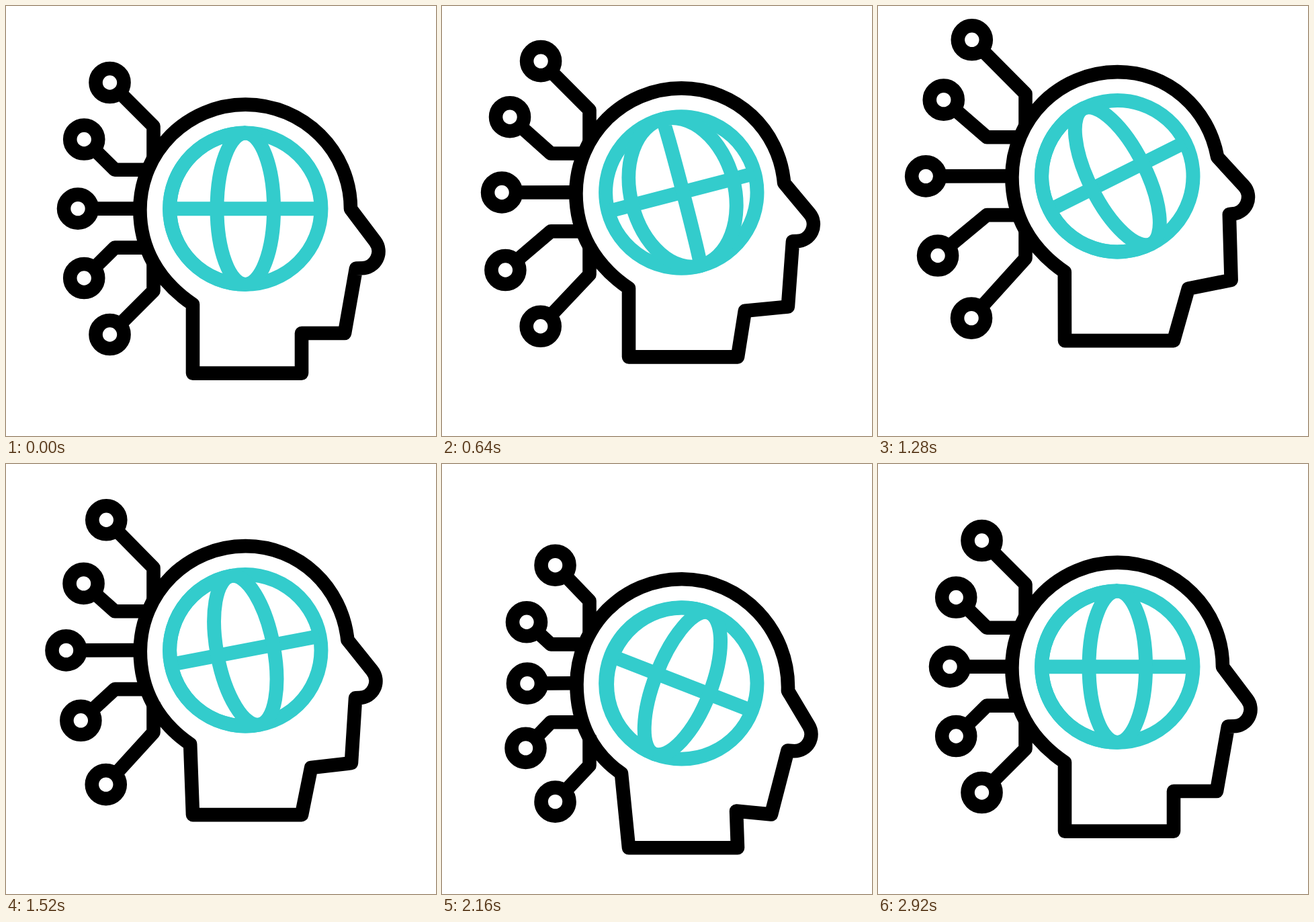
These frames come from a looping animation (640x640 px, 3 s). An HTML page:

```html
<!DOCTYPE html>
<html lang="en">
<head>
<meta charset="utf-8">
<title>Global mind</title>
<style>
  html, body { margin: 0; width: 100%; height: 100%; overflow: hidden; background: #fff; }
  svg { display: block; width: 100vw; height: 100vh; }
</style>
</head>
<body>
<svg viewBox="0 0 640 640" fill="none" stroke="#000" stroke-width="20.6" stroke-linejoin="round">
  <g id="body">
    <g id="links"></g>
    <path id="head"/>
    <g id="globe" stroke="#33cccc" stroke-width="20.9">
      <circle r="112.7"/>
      <path d="M-112 0H112"/>
      <path id="meridians"/>
    </g>
  </g>
</svg>
<script>
const LOOP = 3000, STEP = 40;
const $ = id => document.getElementById(id);
const body = $('body'), head = $('head'), globe = $('globe'), meridians = $('meridians');

const ease = u => {
  u = Math.min(1, Math.max(0, u));
  return u < 0.5 ? 4 * u ** 3 : 1 - 4 * (1 - u) ** 3;
};

// Progress of the three moves: rest to raised, raised to lowered, lowered to rest.
const moves = (t, lead1 = 0, lead2 = 0) => [
  ease((t + lead1 - 165) / 960),
  ease((t + lead2 - 1125) / 900),
  ease((t - 1980) / 900)
];

const mix = ([a, b, c], [p, q, r]) => a + (b - a) * p + (c - b) * q + (a - c) * r;

// Each point: [x at rest, raised, lowered], [y at rest, raised, lowered]
const shape = {
  chin: [[440, 462.4, 438], [487, 468.5, 492]],
  jaw: [[504, 526.4, 489.5], [487, 455.5, 497.2]],
  lip: [[521, 523, 514.3], [390.5, 357.7, 402.3]],
  nose: [[529.5, 526, 524.3], [365.3, 332, 378]],
  brow: [[513, 505, 515], [302, 272.5, 313.3]],
  browGrip: [[513, 491, 518], [216, 200, 223]],
  topGrip: [[443, 432, 446], [146.6, 146.6, 146.2]],
  left: [[199.4, 199.4, 200.5], [303.2, 303.2, 303.2]],
  leftGrip: [[199.4, 199.4, 200.5], [360, 360, 360]],
  napeGrip: [[226, 226, 224], [409, 409, 406]],
  nape: [[278, 278, 266.6], [444, 444.5, 435.6]]
};
const NOSE_R = 25;

const nodes = [
  { at: [[154.5, 139.2, 169], [114, 98.2, 126.4]], wire: 'L219.5 179V226' },
  { at: [[116.2, 94.5, 126.3], [198.5, 185.5, 211]], wire: 'L162 243.7H205', early: true },
  { at: [[107, 70, 127.6], [301.6, 301.8, 302]], wire: 'L195 301.6' },
  { at: [[116.2, 85, 124.8], [405, 422.5, 398]], wire: 'L162 359.6H205', early: true },
  { at: [[154.5, 138.4, 169], [489, 513.8, 477.6]], wire: 'L219.5 424V379' }
];

const add = (tag, attrs) => {
  const el = document.createElementNS('http://www.w3.org/2000/svg', tag);
  for (const k in attrs) el.setAttribute(k, attrs[k]);
  return $('links').appendChild(el);
};
for (const n of nodes) {
  n.line = add('path', {});
  n.ring = add('circle', { r: 21, fill: '#fff' });
}

const place = (pt, m) => [mix(pt[0], m), mix(pt[1], m)];

function headPath(m) {
  const p = {};
  for (const k in shape) p[k] = place(shape[k], m);
  const [cx, cy] = p.nose;
  const dx = p.brow[0] - cx, dy = p.brow[1] - cy;
  const a = Math.atan2(dy, dx) + Math.acos(NOSE_R / Math.hypot(dx, dy));
  const bridge = [cx + NOSE_R * Math.cos(a), cy + NOSE_R * Math.sin(a)];
  return `M278 546.6H440L${p.chin}L${p.jaw}L${p.lip}L${cx} ${cy + NOSE_R}` +
    `A${NOSE_R} ${NOSE_R} 0 0 0 ${bridge}L${p.brow}` +
    `C${p.browGrip} ${p.topGrip} 356.4 146.6` +
    `C270 146.6 ${p.left[0]} 216.6 ${p.left}` +
    `C${p.leftGrip} ${p.napeGrip} ${p.nape}Z`;
}

// Meridians slide right from one slot to the next.
const slots = [-112.7, -42.3, 42.3, 112.7];
const meridianPath = s => slots.slice(0, 3).map((x, i) => {
  const rx = x + (slots[i + 1] - x) * s;
  return Math.abs(rx) < 0.3
    ? 'M0 -112.7V112.7'
    : `M0 -112.7A${Math.abs(rx)} 112.7 0 0 ${rx > 0 ? 1 : 0} 0 112.7`;
}).join('');

function draw(time) {
  const t = Math.floor((time % LOOP) / STEP) * STEP;
  const m = moves(t), early = moves(t, 80, 110), spin = moves(t, 14);
  body.setAttribute('transform', `translate(0 ${mix([0, -50, 25.5], m)})`);
  head.setAttribute('d', headPath(m));
  globe.setAttribute('transform', `translate(356.3 301.7) rotate(${mix([0, -27.6, 22], spin)})`);
  meridians.setAttribute('d', meridianPath((spin[0] + spin[2]) % 1));
  for (const n of nodes) {
    const [x, y] = place(n.at, n.early ? early : m);
    n.line.setAttribute('d', `M${x} ${y}${n.wire}`);
    n.ring.setAttribute('cx', x);
    n.ring.setAttribute('cy', y);
  }
}

const start = performance.now();
function tick() {
  draw(performance.now() - start);
  requestAnimationFrame(tick);
}
tick();
</script>
</body>
</html>
```
